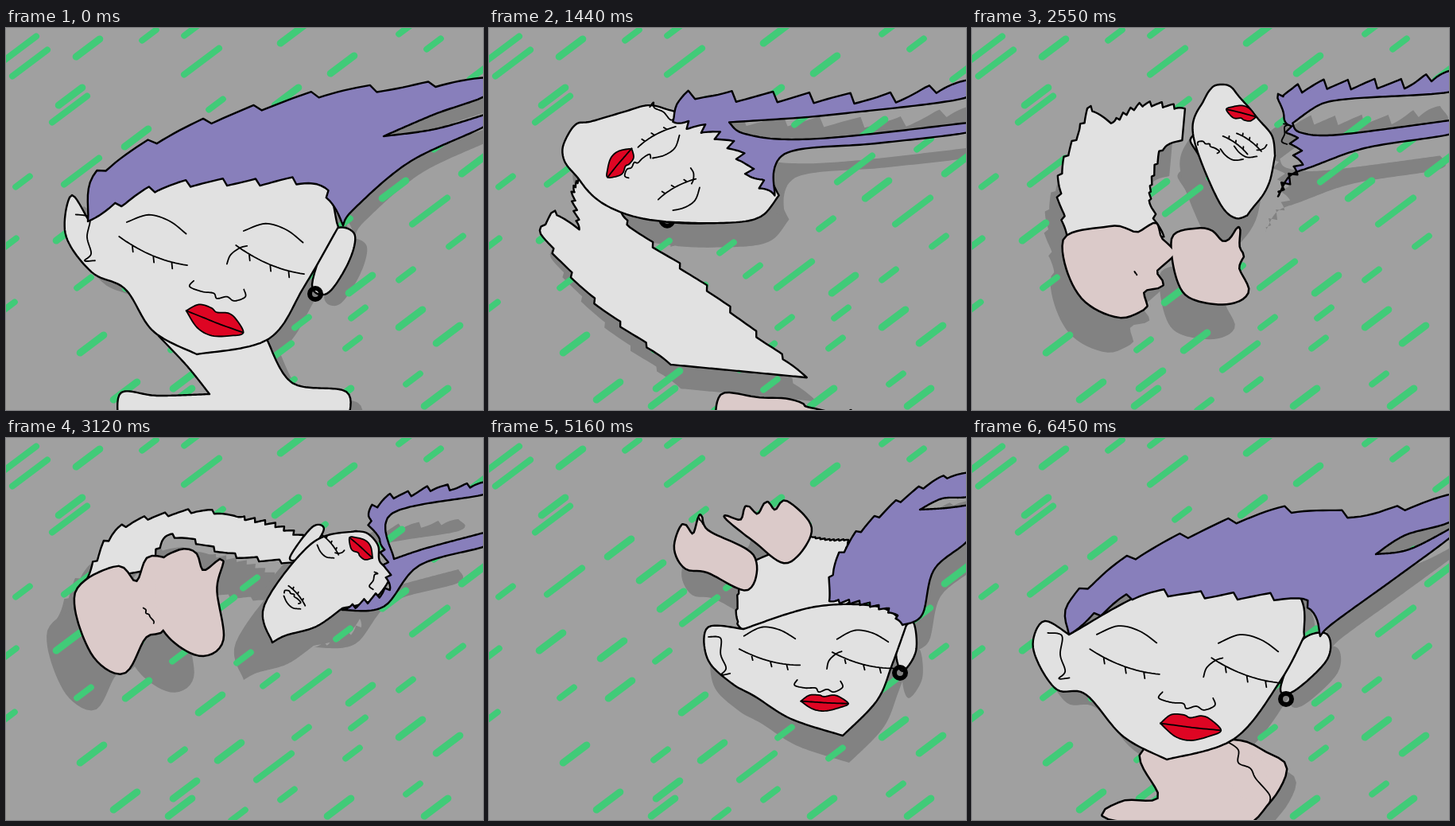
Recreate the animation shown at these times as an HTML page with a canvas. Size 600 px wide and 480 px high, loop 6.48 s.

```html
<!DOCTYPE html>
<html>
<head>
<meta charset="utf-8">
<style>
html, body { margin: 0; width: 600px; height: 480px; overflow: hidden; background: #a0a0a0; }
canvas { display: block; }
</style>
</head>
<body>
<canvas id="stage" width="600" height="480"></canvas>
<script>
const ctx = document.getElementById('stage').getContext('2d');
const LOOP = 6480, STEP = 30, SAMPLES = 70;
const INK = '#000', SKIN = '#e1e1e1', PINK = '#dbcac9', PURPLE = '#887fbb', GREEN = '#41cb78';
const SOLIDS = ['body', 'footA', 'footB', 'ear', 'head', 'hair'];

const toNumbers = text => text.split(' ').map(Number);
const toPoints = text => {
  const n = toNumbers(text);
  return n.flatMap((x, i) => i % 2 ? [] : [[x, n[i + 1]]]);
};

// Rain: centres of slanted strokes, grouped by length
const rain = new Map();
function addRain(length, width, text) {
  const path = new Path2D(), dx = length * 0.4, dy = length * 0.3;
  for (const [x, y] of toPoints(text)) {
    path.moveTo(x - dx, y + dy);
    path.lineTo(x + dx, y - dy);
  }
  rain.set(path, width);
}
addRain(22, 8, '180 9 233 3 264 96 21 193 393 115 4 271 218 274 98 320 2 351 216 398 354 448 307 182 299 276 332 305 372 370 424 246 547 146 566 268 503 310 443 358 436 396 512 441 592 58 538 20 503 1 292 474');
addRain(37, 9, '103 25 360 8 423 46 353 86 164 138 204 168 230 204 78 256 155 266 165 316 108 397 257 334 281 394 150 456 225 442 219 464 488 203 588 172 446 322 509 365 419 464 556 385 541 464 483 126 81 86');
addRain(55, 8, '16 27 30 44 246 42 95 180 265 217 337 413 384 310 460 177 533 230 80 102');

function smooth(pts, loop) {
  const out = [pts[0]], n = pts.length;
  const at = i => loop ? pts[(i + n) % n] : pts[Math.max(0, Math.min(n - 1, i))];
  for (let i = 0; i < (loop ? n : n - 1); i++) {
    const a = at(i - 1), b = at(i), c = at(i + 1), d = at(i + 2);
    for (let k = 1; k <= 8; k++) {
      const u = k / 8;
      out.push([0, 1].map(j => b[j] + u / 2 * (c[j] - a[j] +
        u * (2 * a[j] - 5 * b[j] + 4 * c[j] - d[j] + u * (3 * (b[j] - c[j]) + d[j] - a[j])))));
    }
  }
  return out;
}

// Evenly spaced points along a line, with teeth of the given height
function resample(pts, teeth) {
  const len = [0];
  for (let i = 1; i < pts.length; i++)
    len.push(len[i - 1] + Math.hypot(pts[i][0] - pts[i - 1][0], pts[i][1] - pts[i - 1][1]));
  const out = [];
  for (let k = 0, i = 1; k <= SAMPLES; k++) {
    const u = k / SAMPLES, s = len[len.length - 1] * u;
    while (i < pts.length - 1 && len[i] < s) i++;
    const [x, y] = pts[i - 1], dx = pts[i][0] - x, dy = pts[i][1] - y, gap = len[i] - len[i - 1] || 1;
    const f = (s - len[i - 1]) / gap;
    const lift = teeth * (u * 8 % 1 - 0.5) * Math.min(1, 7 * u, 7 * (1 - u)) * 2 / gap;
    out.push(x + f * dx + lift * dy, y + f * dy - lift * dx);
  }
  return out;
}

// "|" marks a corner; rough lists the parts that carry teeth
function trace(text, rough, teeth) {
  const parts = text.split('|'), loop = parts.length === 1;
  let last;
  return parts.flatMap((part, i) => {
    const pts = (last ? [last] : []).concat(toPoints(part));
    last = pts[pts.length - 1];
    return resample(smooth(pts, loop), rough.includes(i) ? teeth : 0);
  });
}

const times = [];
const shapes = Object.fromEntries(SOLIDS.map(k => [k, []]));
function addPose(time, hairTeeth, bodyTeeth, parts) {
  times.push(time);
  for (const k of SOLIDS) {
    const rough = { hair: [0, 4], body: [0, 1, 3] }[k] || [];
    shapes[k].push(trace(parts[k], rough, k === 'hair' ? hairTeeth : bodyTeeth));
  }
}

const away = '430 570 500 600 430 640 400 600';
addPose(0, 5, 0, {
  hair: '103 243 112 186 195 138 300 104 410 80 510 74 605 62|605 84 540 108 475 136|540 127 605 108|605 122 508 168 437 228 424 248|390 197 304 194 190 201 103 243',
  head: '103 240 82 210 75 260 108 307 150 328 185 381 240 410|330 391 375 325 418 250|380 182 200 185 103 240',
  ear: '410 256 438 258 432 292 405 333 385 322',
  body: '192 387 228 425 256 460|190 462 145 458 141 495|430 495|428 457 360 446 328 391',
  footA: away, footB: away });
addPose(810, 5, 1, {
  hair: '157 147 168 119 240 108 340 100 440 93 520 88 605 76|605 82 440 121 317 152|440 148 605 125|605 133 480 157 390 188 372 219|345 195 285 152 220 138 157 147',
  head: '168 122 125 132 105 160 78 200 76 255 84 290 110 300|200 319 280 286 371 222|330 168 230 126 168 122',
  ear: '310 262 345 244 340 280 290 300 245 308',
  body: '112 300 150 330 182 362|95 348 140 390 265 485|470 500|380 405 264 345 205 318',
  footA: away, footB: away });
addPose(2010, 9, 4, {
  hair: '308 108 314 72 348 74 405 76 455 77 530 80 605 54|605 88 450 95 330 95|340 118 410 130 605 112|605 128 480 142 365 150 363 208|348 190 346 165 330 130 308 108',
  head: '322 125 283 90 218 76 188 45 160 60 156 80 160 103|180 155 300 225 345 237 362 210|357 180 345 158 322 125',
  ear: '295 212 280 223 230 202 198 188 215 178',
  body: '160 103 110 112 90 165|66 140 100 260 172 350|318 362|230 285 155 180 172 150',
  footA: '165 350 220 347 295 347 283 380 308 392 272 403 293 413 268 422 279 441 190 418',
  footB: '315 370 350 368 390 374 402 354 410 374 421 380 404 389 416 412 390 423 335 430' });
addPose(3120, 4, 3, {
  hair: '470 127 455 98 478 76 510 69 540 62 570 62 605 55|605 70 485 95 488 152|530 138 605 118|605 135 520 160 475 212 423 216|455 204 480 188 478 160 470 127',
  head: '423 214 462 203 484 172 470 155 468 135 455 120 440 117|385 132 325 210 335 257|352 248 390 237 423 214',
  ear: '372 152 357 150 385 112 400 114 385 140',
  body: '385 130 340 110 288 98|230 92 140 115 100 180|185 165|205 123 290 148 372 158',
  footA: '88 195 140 162 164 182 180 150 212 165 200 237 175 250 148 295 108 270',
  footB: '190 165 217 142 238 145 248 168 272 153 264 190 272 255 240 272 195 235' });
addPose(4080, 4, 5, {
  hair: '500 148 508 120 528 105 548 88 570 80 585 72 605 56|605 82 560 102 530 138|560 124 605 95|605 116 560 142 528 185 516 210|512 190 507 172 505 160 500 148',
  head: '400 324 430 319 448 316 457 306 480 300 503 265 512 225|500 168 455 160 375 195|338 225 342 285 400 324',
  ear: '456 160 462 144 482 150 506 160 490 172',
  body: '418 165 380 132 345 116|330 110 310 104 285 95|245 125|290 144 340 165 385 195',
  footA: '30 130 60 80 92 95 125 73 150 75 180 120 165 172 122 215 60 172',
  footB: '132 83 165 52 198 75 235 53 255 67 297 80 250 120 222 170 160 165' });
addPose(5160, 3, 1, {
  hair: '428 205 432 165 458 125 495 93 530 70 565 52 605 43|605 72 570 76 542 90|575 88 605 84|605 125 560 165 545 222 520 235|505 218 480 210 455 206 428 205',
  head: '320 240 275 238 275 278 305 308 335 325 380 353 445 374|488 330 507 285 525 235|490 212 410 212 320 240',
  ear: '520 242 534 232 537 268 520 293 512 270',
  body: '455 205 448 160 452 128|430 128 415 126 405 124|320 160|313 200 318 240 380 260',
  footA: '275 168 247 163 234 138 244 109 257 122 266 97 275 117 332 148 325 190',
  footB: '335 130 297 99 317 104 324 86 338 97 349 81 360 92 374 80 405 115 375 156' });
addPose(6450, 5, 0, {
  hair: '122 247 120 210 178 162 270 122 390 90 500 96 605 70|605 103 545 122 508 146|550 140 605 112|605 122 538 172 455 232 438 249|415 205 300 198 200 199 122 247',
  head: '122 247 90 230 77 265 105 315 143 322 190 375 245 404|330 378 388 305 418 249|400 190 250 184 122 247',
  ear: '413 256 446 246 447 278 405 318 388 314',
  body: '320 380 325 390 322 400|318 410 300 425 280 430|250 430|240 410 225 400 215 390',
  footA: '172 478 190 457 236 452 215 393 325 380 370 396 395 415 373 458 325 490',
  footB: '330 400 370 410 360 450 330 445' });

// One entry per pose
const track = text => text.split('|').map(toNumbers);
const shade = track('15 14|17 19|4 40|-36 47|-31 43|8 34|13 17');
const turn = track('8 1|68 .7|190 .5|215 .35|340 .4|360 .85|365 1'); // degrees, scale
const eyeL = track('185 281|133 186|293 117|366 198|464 266|353 276|192 282');
const eyeR = track('332 292|215 240|285 172|408 134|398 232|470 280|345 293');
const nose = track('267 328|160 255|240 124|360 200|437 228|415 309|271 328');
const fold = track('98 262|128 145|315 95|463 180|498 157|288 272|107 272');
const ring = track('389 334|253 306|240 185|420 140|470 200|517 295|395 328');
const mouth = track('263 367 12 1 1|136 266 64 .72 .9|234 106 166 .55 .55|446 139 211 .5 .6|481 199 350 .68 1|422 331 356 .78 .6|275 361 358 1 .95');
const gold = track('0|0|0|0|1|0|0');
const crease = track('347 620 1|347 620 1|240 400 0|179 223 .25|158 130 .25|266 104 .1|347 420 1');

// Cubic blend through the key poses
function blend(frames, t) {
  const end = times.length - 1;
  let i = 0;
  while (i < end - 1 && t >= times[i + 1]) i++;
  const h = Math.max(i - 1, 0), k = Math.min(i + 2, end);
  const span = times[i + 1] - times[i], u = (t - times[i]) / span, v = 1 - u;
  return frames[i].map((p, j) => {
    const q = frames[i + 1][j];
    const m = (q - frames[h][j]) / (times[i + 1] - times[h]) * span;
    const n = (frames[k][j] - p) / (times[k] - times[i]) * span;
    return v * v * (1 + 2 * u) * p + u * u * (3 - 2 * u) * q + u * v * (v * m - u * n);
  });
}

function toPath(n, closed) {
  const path = new Path2D();
  for (let i = 0; i < n.length; i += 2) path.lineTo(n[i], n[i + 1]);
  if (closed) path.closePath();
  return path;
}

const curve = text => toPath(smooth(toPoints(text)).flat());
const browPath = curve('-38 6 -12 -7 15 -3 38 10');
const nosePath = curve('-32 -6 -36 2 -20 6 -5 6 0 12 12 8 22 12 35 5 32 -4');
const foldPath = curve('-14 -26 4 -24 4 0 12 20 5 30 18 28');
const bridgePath = curve('-53 12 -50 0 -40 -10 -31 -14');
const creasePath = curve('-25 -38 -12 -28 -12 -12 3 -5 10 8 27 28 27 39');
const lipPath = curve('-38 -4 -24 -15 -8 -14 0 -10 14 -12 25 -7 38 8 24 15 0 20 -20 14 -38 -4');
const lipLinePath = curve('-38 -4 -15 0 8 4 38 8');
const lidY = x => 11 - (x - 45) ** 2 / 340;
const eyePath = new Path2D();
for (let x = -45; x <= 45; x += 5) eyePath.lineTo(x, lidY(x));
for (const x of [-27, 1, 25]) {
  eyePath.moveTo(x, lidY(x));
  eyePath.lineTo(x + 2, lidY(x) + 8);
}

function stroke(path, width, color = INK) {
  ctx.lineWidth = width;
  ctx.strokeStyle = color;
  ctx.stroke(path);
}

function fill(path, color) {
  ctx.fillStyle = color;
  ctx.fill(path);
}

function disc(x, y, r) {
  const path = new Path2D();
  path.arc(x, y, r, 0, 7);
  return path;
}

// Path placed by centre, turn and scale, keeping an even line width
function place(path, [x, y], degrees, sx, sy = sx, color) {
  const moved = new Path2D();
  moved.addPath(path, new DOMMatrix().translate(x, y).rotate(degrees).scale(sx, sy));
  if (color) fill(moved, color);
  stroke(moved, 1.8);
}

function draw(t) {
  const shape = Object.fromEntries(SOLIDS.map(k => [k, toPath(blend(shapes[k], t), true)]));
  const solid = (key, color) => { fill(shape[key], color); stroke(shape[key], 2.4); };
  ctx.lineCap = ctx.lineJoin = 'round';
  ctx.fillStyle = '#a0a0a0';
  ctx.fillRect(0, 0, 600, 480);

  ctx.save();
  ctx.translate(...blend(shade, t));
  for (const k of SOLIDS) fill(shape[k], '#828282');
  ctx.restore();
  rain.forEach((width, path) => stroke(path, width, GREEN));

  solid('body', SKIN);
  // Feet share one outline where they merge
  const feet = [shape.footA, shape.footB];
  feet.forEach(p => stroke(p, 5));
  feet.forEach(p => fill(p, PINK));
  const [cx, cy, size] = blend(crease, t);
  place(creasePath, [cx, cy], 0, size);

  solid('ear', SKIN);
  stroke(disc(...blend(ring, t), 7), 6);
  solid('head', SKIN);
  const [angle, scale] = blend(turn, t);
  place(foldPath, blend(fold, t), angle, scale);
  solid('hair', PURPLE);

  const rad = angle * Math.PI / 180, rise = 38 * scale;
  for (const eye of [eyeL, eyeR]) {
    const [x, y] = blend(eye, t);
    place(eyePath, [x, y], angle, scale);
    place(browPath, [x + rise * Math.sin(rad), y - rise * Math.cos(rad)], angle, scale);
    if (eye === eyeR) place(bridgePath, [x, y], angle, scale);
  }
  place(nosePath, blend(nose, t), angle, scale);

  const [x, y, tilt, wide, tall] = blend(mouth, t);
  const glow = Math.max(0, blend(gold, t)[0]);
  const rgb = [222 + 33 * glow, 5 + 245 * glow, 35 - 35 * glow].map(Math.round);
  place(lipPath, [x, y], tilt, wide, tall, `rgb(${rgb})`);
  if (glow < 0.3) place(lipLinePath, [x, y], tilt, wide, tall);
  fill(disc(x + 8, y - 3, 11 * glow), INK);
}

function tick() {
  draw(Math.floor(performance.now() % LOOP / STEP) * STEP);
  requestAnimationFrame(tick);
}
tick();
</script>
</body>
</html>
```
